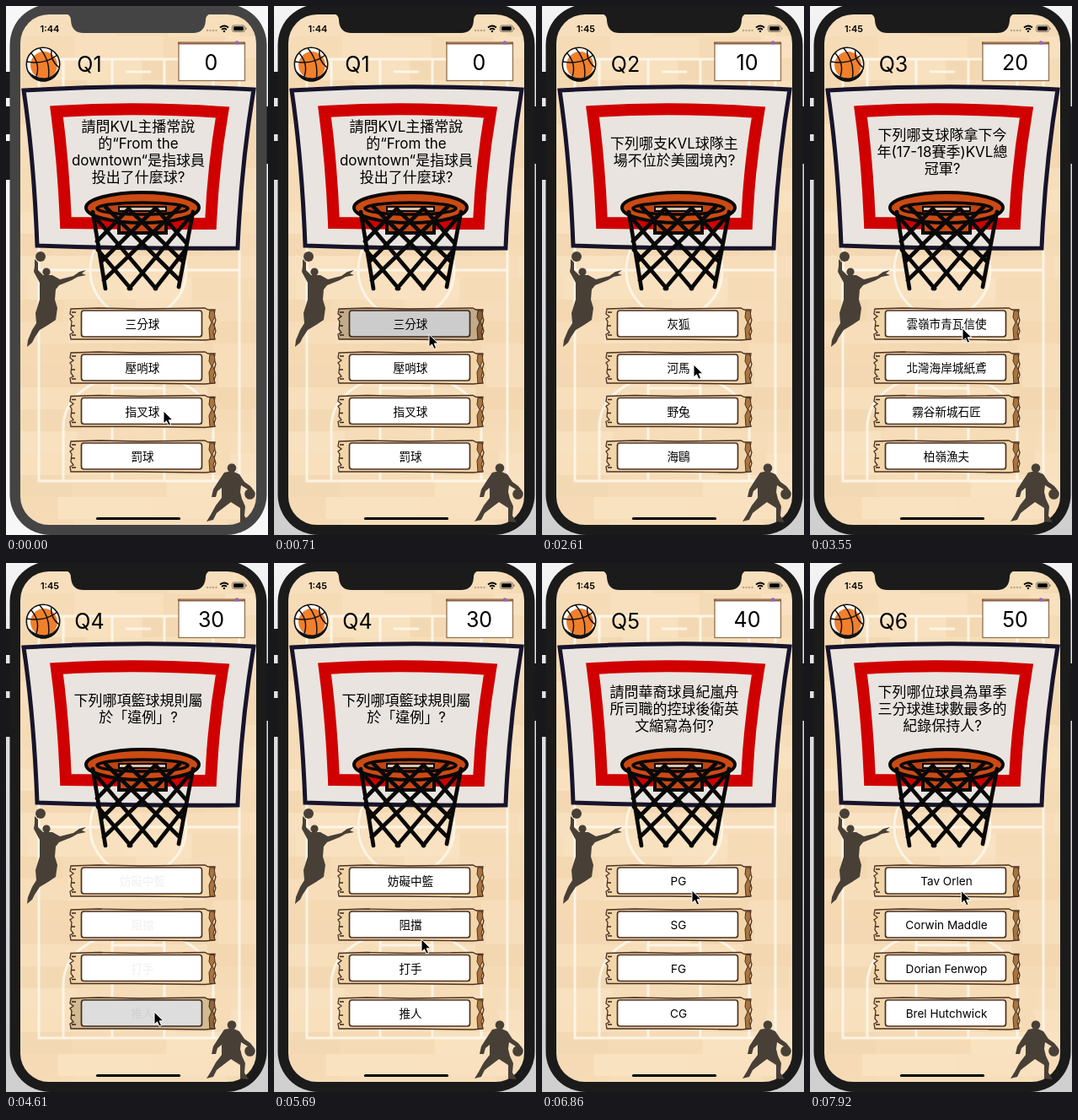
Write an HTML page that moves like this. It is 311x627 px and loops after 8 s.

```html
<!DOCTYPE html>
<html lang="zh-Hant">
<head>
<meta charset="utf-8">
<title>Basketball quiz</title>
<style>
html, body { margin: 0; width: 100%; height: 100%; overflow: hidden; background: #fff; }
svg { display: block; width: 311px; height: 627px; font-family: Inter, "Noto Sans CJK TC", "Noto Sans CJK", sans-serif; }
text { text-anchor: middle; }
</style>
</head>
<body>
<svg id="stage" viewBox="0 0 311 627">
  <defs>
    <clipPath id="screen"><rect x="17" y="10" width="280" height="605" rx="34"/></clipPath>
    <linearGradient id="shadow" x2="0" y2="1"><stop stop-color="#f4f4f4"/><stop offset=".3" stop-color="#dedede"/><stop offset="1" stop-color="#cfcfcf"/></linearGradient>
    <g id="plank">
      <path d="M77 -18 L110 -19 L160 -18 L236 -19 L240 -17 L248 -17 L247 -10 L249 -5 L247 2 L249 8 L247 14 L248 18 L236 19 L150 18 L77 18 L76 12 L80 10 L77 6 L78 -3 L76 -6 L80 -9 L76 -12 Z" fill="#f2d6aa" stroke="#4b3122" stroke-width="1.3"/>
      <path d="M242 -16 L241 -8 L244 -2 L241 5 L242 18 L248 18 L246 10 L248 4 L245 -3 L248 -9 L247 -16 Z" fill="#a9743f" stroke="#4b3122"/>
      <path d="M78 -14 h5 M78 2 h4 M78 13 h5" stroke="#3d281c" stroke-width="1.4"/>
      <rect x="89.5" y="-16" width="143" height="31" rx="3" fill="#fff" stroke="#4b3122" stroke-width="1.7"/>
    </g>
    <g id="halfCourt">
      <path d="M39 313 V563 H277 V313 M68 563 V500 C68 415 246 415 246 500 V563 M126 563 V453 H188 V563"/>
      <path d="M126 453 A31 31 0 0 1 188 453 M142 548 H172"/>
    </g>
  </defs>

  <rect id="backdrop" width="311" height="627"/>
  <path d="M2.5 78 V109 M2.5 119 V152 M2.5 160 V206 M309.5 119 V187" stroke="#181818" stroke-width="5"/>
  <rect id="bezel" x="4.500" y="-2" width="305" height="629" rx="48"/>

  <g clip-path="url(#screen)">
    <rect x="17" y="10" width="280" height="605" fill="#f9e2c1"/>
    <g id="wood" fill="#d9ac70"></g>
    <g fill="none" stroke="#fffaf0" stroke-width="3" opacity=".8">
      <use href="#halfCourt"/>
      <use href="#halfCourt" transform="matrix(1 0 0 -1 0 626)"/>
      <path d="M39 313 H277"/><circle cx="157" cy="313" r="57"/>
    </g>
    <path d="M70 9 Q77 10 77 17 Q78 32 92 32 H222 Q236 32 237 17 Q237 10 244 9 Z" id="notch"/>
  </g>

  <text id="clock" x="52" y="31" font-size="11" font-weight="600"></text>
  <g fill="#b7a58c"><circle cx="239" cy="29" r="1.2"/><circle cx="242.5" cy="29" r="1.2"/><circle cx="246" cy="29" r="1.2"/><circle cx="249.5" cy="29" r="1.2"/></g>
  <path d="M254 25.500 Q259 21.500 264 25.500 M256 28 Q259 25.500 262 28" fill="none" stroke="#000" stroke-width="1.7"/>
  <circle cx="259" cy="30" r="1.2"/>
  <rect x="268.5" y="23" width="15" height="7.500" rx="2" fill="none" stroke="#665b4d" stroke-width=".8"/>
  <rect x="270" y="24.300" width="12" height="5" rx="1"/><path d="M285 25.500 v2.500" stroke="#665b4d"/>

  <g fill="none" stroke="#111" stroke-width="1.5">
    <circle cx="44" cy="69" r="19.700" fill="#fff" stroke-width="1.6"/>
    <circle cx="45" cy="70" r="16" fill="#f1802c" stroke="none"/>
    <path d="M25 66 Q46 70 61 58 M40 50 Q54 66 50 88 M30 56 Q42 70 35 86 M54 52 Q52 64 63 73"/>
    <path d="M26 77 Q34 91 48 89 Q61 86 63 74 Q57 85 46 86 Q34 86 26 77" fill="#111" stroke-width="1"/>
  </g>
  <text id="number" x="99" y="78" font-size="25"></text>
  <rect x="205" y="44" width="78.500" height="44.500" fill="#fff" stroke="#94714f" stroke-width="1.3"/>
  <path d="M204 44 H284" stroke="#8a6049" stroke-width="3"/><path d="M207 43 H281" stroke="#c59b6c"/>
  <circle cx="274" cy="43.500" r="2.200" fill="#9366c8"/>
  <text id="score" x="243.500" y="76" font-size="25"></text>

  <path d="M21 100 Q157 92 294 99 Q279 190 275 287 Q155 288 37 284 Q33 180 21 100 Z" fill="#e9e4df" stroke="#17142b" stroke-width="5"/>
  <path d="M60 125 Q155 119 257 126 Q246 190 243 258 Q155 258 71 257 Q68 185 60 125 Z" fill="none" stroke="#d00000" stroke-width="14"/>
  <g id="question" font-size="17"></g>

  <g stroke="#080808" fill="none">
    <path d="M134 247 H190 V269 H134 Z" fill="#c94712" stroke-width="4"/>
    <ellipse cx="162" cy="239" rx="67" ry="18" fill="#cc4a14" stroke-width="4"/>
    <ellipse cx="162" cy="240" rx="54" ry="7" fill="#c04310" stroke-width="3.500"/>
    <path d="M134 238 H190 V243 H134 Z" fill="#d8c3ae" stroke-width="2"/>
    <path d="M103 244 L118 335 M222 244 L205 333 M103 247 L178 335 M118 238 L206 325 M146 241 L210 303 M178 240 L214 281 M109 289 L148 335 M221 247 L146 335 M206 238 L116 325 M177 240 L113 303 M146 240 L108 279 M213 289 L177 335" stroke-width="4.700" stroke-linecap="round"/>
  </g>

  <g fill="#484037">
    <circle cx="41" cy="297" r="6"/><circle cx="48" cy="315" r="4.600"/>
    <path d="M34 300 L38 304 L38 313 L44 319 L55 319 L64 324 L80 320 L87 315 L95 313 L90 317 L95 319 L85 321 L78 325 L63 331 L59 336 L58 348 L61 358 L59 372 L50 378 L40 384 L34 393 L31 399 L25 404 L26 396 L31 384 L36 376 L35 364 L40 348 L40 328 L33 315 L34 308 Z"/>
    <circle cx="268" cy="547.500" r="5.300"/><circle cx="289.500" cy="578.500" r="6.300"/>
    <path d="M259 553 L268 551 L277 555 L283 564 L290 569 L294 574 L287 573 L279 568 L278 576 L280 584 L284 593 L283 604 L288 612 L278 611 L278 595 L267 588 L259 594 L250 601 L246 609 L238 611 L243 603 L249 592 L256 583 L256 571 L251 575 L249 582 L244 582 L246 573 L253 562 Z"/>
  </g>

  <g id="options" font-size="13.600"></g>
  <path d="M108.500 607.500 H205.500" stroke="#000" stroke-width="3.200" stroke-linecap="round"/>
  <path id="cursor" d="M0 0 V15 L3.500 11.800 L6 17.300 L8.600 16.200 L6.200 10.800 H11 Z" stroke="#fff" stroke-width="1"/>
</svg>
<script>
const LOOP = 8000, STEP = 118.25;
const $ = id => document.getElementById(id);

// "at" is the step a question appears; "pressed" is the option tapped to reach it
const questions = [
  { at: -9, pressed: -1, lines: ['請問KVL主播常說', '的“From the', 'downtown“是指球員', '投出了什麼球?'], options: ['三分球', '壓哨球', '指叉球', '罰球'] },
  { at: 7, pressed: 0, lines: ['下列哪支KVL球隊主', '場不位於美國境內?'], options: ['灰狐', '河馬', '野兔', '海鷗'] },
  { at: 26, pressed: 0, lines: ['下列哪支球隊拿下今', '年(17-18賽季)KVL總', '冠軍?'], options: ['雲嶺市青瓦信使', '北灣海岸城紙鳶', '霧谷新城石匠', '柏嶺漁夫'] },
  { at: 39, pressed: 3, lines: ['下列哪項籃球規則屬', '於「違例」?'], options: ['妨礙中籃', '阻擋', '打手', '推人'] },
  { at: 52, pressed: 0, lines: ['請問華裔球員紀嵐舟', '所司職的控球後衛英', '文縮寫為何?'], options: ['PG', 'SG', 'FG', 'CG'] },
  { at: 63, pressed: 0, lines: ['下列哪位球員為單季', '三分球進球數最多的', '紀錄保持人?'], options: ['Tav Orlen', 'Corwin Maddle', 'Dorian Fenwop', 'Brel Hutchwick'] }
];

// Pointer path: step, x, y
const pointer = [
  [0, 187, 480], [5, 184, 389], [11, 184, 390], [18, 184, 390], [22, 180, 425], [23, 180, 425],
  [25, 181, 382], [33, 181, 382], [37, 176, 532], [47, 176, 532], [48, 175, 446],
  [50, 178, 389], [57, 178, 389], [58, 178, 388], [61, 178, 388], [63, 179.5, 388.5], [68, 179.5, 388.5]
];

const optionY = [377, 429, 480.5, 534];

function buildWood() {
  let seed = 7, html = '';
  const random = () => (seed = seed * 16807 % 2147483647) / 2147483647;
  for (let y = 10; y < 615; y += 26) {
    for (let x = 17 - random() * 60; x < 297;) {
      const width = 45 + random() * 75;
      html += `<rect x="${x}" y="${y}" width="${width}" height="26" opacity="${random() * .2}"/>`;
      x += width;
    }
  }
  $('wood').innerHTML = html;
}

function buildOptions() {
  $('options').innerHTML = optionY.map(y =>
    `<use href="#plank" y="${y}"/><rect class="shade" x="77" y="${y - 18}" width="171" height="36" opacity="0"/>` +
    `<text class="label" x="162" y="${y + 5}"></text>`).join('');
}

function pointerAt(step) {
  const i = pointer.findIndex(key => key[0] > step);
  const [s0, x0, y0] = pointer[i - 1], [s1, x1, y1] = pointer[i];
  const k = (step - s0) / (s1 - s0);
  return [x0 + (x1 - x0) * k, y0 + (y1 - y0) * k];
}

function showQuestion(index) {
  const { lines } = questions[index];
  const top = 179 - (lines.length - 1) * 10;
  $('question').innerHTML = lines.map((line, i) => `<text x="157" y="${top + i * 20}">${line}</text>`).join('');
  $('number').textContent = 'Q' + (index + 1);
  $('score').textContent = index * 10;
  labels.forEach((label, i) => label.textContent = questions[index].options[i]);
}

buildWood();
buildOptions();
const labels = document.querySelectorAll('.label');
const shades = document.querySelectorAll('.shade');
let shownStep = -1, shownQuestion = -1;

function render(step) {
  const index = questions.findLastIndex(q => q.at <= step);
  if (index !== shownQuestion) showQuestion(shownQuestion = index);

  const fade = Math.min(1, Math.max(.06, (step - questions[index].at) / 4));
  labels.forEach(label => label.setAttribute('opacity', fade));
  shades.forEach((shade, i) => {
    const tap = questions.find(q => q.pressed === i && step >= q.at - 1 && step < q.at + 2);
    shade.setAttribute('opacity', tap ? .2 * (tap.at + 2 - step) / 3 : 0);
  });

  const active = step >= 6;
  $('backdrop').setAttribute('fill', active ? 'url(#shadow)' : '#f7f7f7');
  for (const id of ['bezel', 'notch']) $(id).setAttribute('fill', active ? '#1b1b1b' : '#444');
  $('clock').textContent = step < 13 ? '1:44' : '1:45';
  $('cursor').setAttribute('transform', `translate(${pointerAt(step)})`);
}

function tick() {
  const step = Math.min(67, Math.floor((performance.now() % LOOP + 9) / STEP));
  if (step !== shownStep) render(shownStep = step);
  requestAnimationFrame(tick);
}
tick();
</script>
</body>
</html>
```
